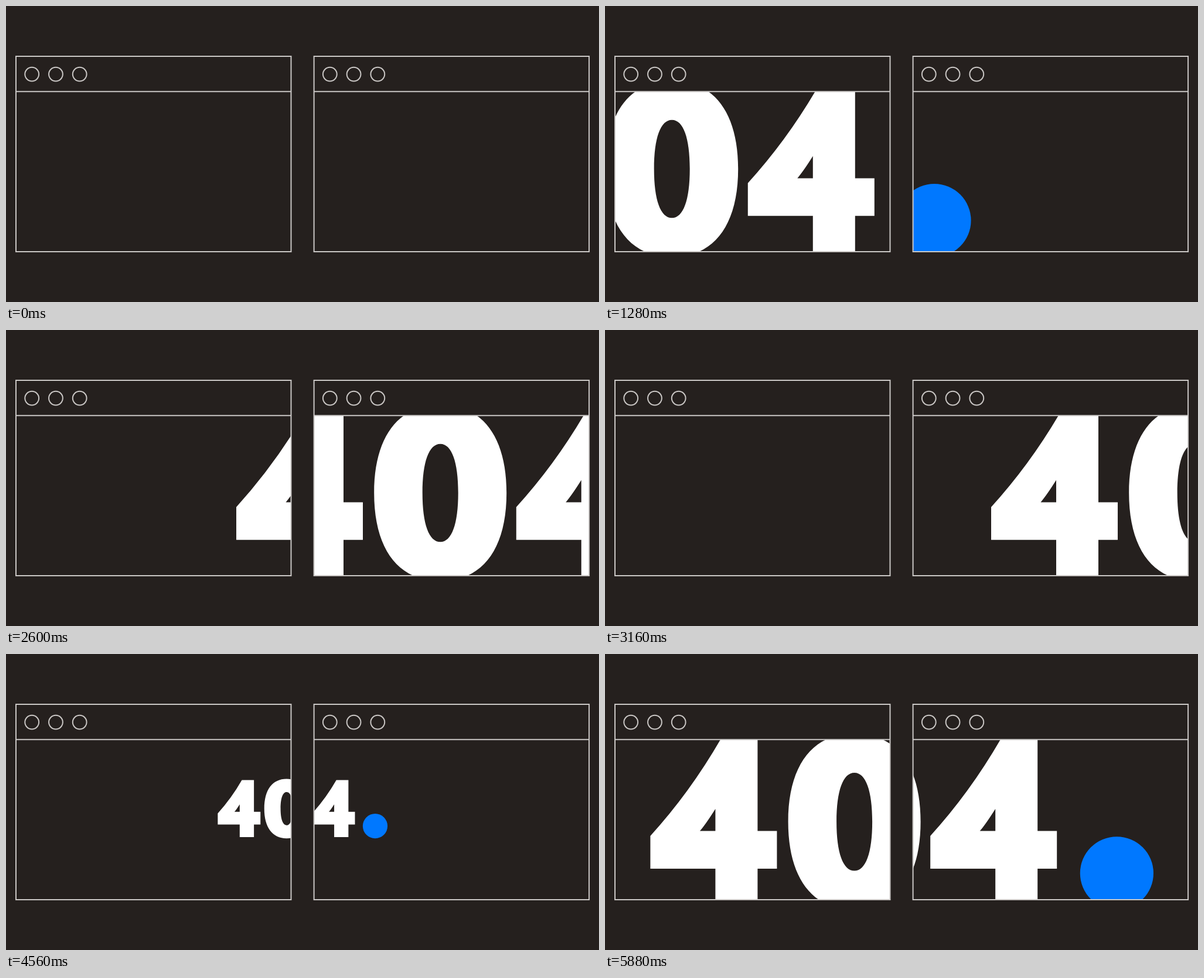
An HTML page with a canvas for the animation above (8.84 s loop, 1012 by 506 pixels).

```html
<!DOCTYPE html>
<html lang="en">
<head>
<meta charset="utf-8">
<title>404</title>
<style>
  html, body { margin: 0; width: 100%; height: 100%; overflow: hidden; background: #25201e; }
  canvas { display: block; width: 1012px; height: 506px; }
</style>
</head>
<body>
<canvas id="stage" width="1012" height="506"></canvas>
<script>
const LOOP = 8840, STEP = 40;
const SPEED = 0.475, PASS_START = -842;
const ZOOM_AT = 3902, ZOOM_TIME = 1950;
const BG = '#25201e', LINE = '#cac7c5', WHITE = '#ffffff', BLUE = '#0078ff';
const LEFT = 17, RIGHT = 486.5, TOP = 86, BAR = 146.3, BOTTOM = 420;
const GAP = 508.6;

const ctx = document.getElementById('stage').getContext('2d');

// Ellipse with fuller shoulders
function oval(path, cx, cy, rx, ry, k = 0.635) {
  const kx = rx * k, ky = ry * k;
  path.moveTo(cx + rx, cy);
  path.bezierCurveTo(cx + rx, cy + ky, cx + kx, cy + ry, cx, cy + ry);
  path.bezierCurveTo(cx - kx, cy + ry, cx - rx, cy + ky, cx - rx, cy);
  path.bezierCurveTo(cx - rx, cy - ky, cx - kx, cy - ry, cx, cy - ry);
  path.bezierCurveTo(cx + kx, cy - ry, cx + rx, cy - ky, cx + rx, cy);
  path.closePath();
}

function four(path, x) {
  path.moveTo(x, 302.7);
  path.quadraticCurveTo(x + 68.9, 226.9, x + 122, 134);
  for (const [dx, y] of [[183, 134], [183, 294.4], [216, 294.4], [216, 358.8],
                         [183, 358.8], [183, 422.8], [111, 422.8], [111, 358.8], [0, 358.8]]) {
    path.lineTo(x + dx, y);
  }
  path.closePath();
  path.moveTo(x + 84.5, 294.4);
  path.quadraticCurveTo(x + 95, 282, x + 111, 256.5);
  path.lineTo(x + 111, 294.4);
  path.closePath();
}

const digits = new Path2D();
four(digits, 0);
oval(digits, 348.2, 278.5, 113, 150.8);
oval(digits, 348.2, 278.5, 30.5, 83.8);
four(digits, 477.8);

const dot = new Path2D();
dot.arc(796, 366.6, 62.6, 0, Math.PI * 2);

function drawNumber(t) {
  if (t < ZOOM_AT) {
    ctx.translate(PASS_START + SPEED * t, 0);
  } else {
    const s = Math.min(1, (t - ZOOM_AT) / ZOOM_TIME);
    ctx.translate(506, 253);
    ctx.scale(s, s);
    ctx.translate(-428.6, -244.8);
  }
  ctx.fillStyle = WHITE;
  ctx.fill(digits, 'evenodd');
  ctx.fillStyle = BLUE;
  ctx.fill(dot);
}

function drawWindow(x, t) {
  ctx.save();
  ctx.beginPath();
  ctx.rect(LEFT + x, BAR, RIGHT - LEFT, BOTTOM - BAR);
  ctx.clip();
  drawNumber(t);
  ctx.restore();

  ctx.strokeStyle = LINE;
  ctx.lineWidth = 2;
  ctx.strokeRect(LEFT + x, TOP, RIGHT - LEFT, BOTTOM - TOP);
  ctx.beginPath();
  ctx.moveTo(LEFT + x, BAR);
  ctx.lineTo(RIGHT + x, BAR);
  ctx.stroke();
  for (let i = 0; i < 3; i++) {
    ctx.beginPath();
    ctx.arc(44.2 + 40.75 * i + x, 116.6, 11.9, 0, Math.PI * 2);
    ctx.stroke();
  }
}

function draw(t) {
  ctx.fillStyle = BG;
  ctx.fillRect(0, 0, 1012, 506);
  drawWindow(0, t);
  drawWindow(GAP, t);
}

const start = performance.now();
function tick() {
  const t = (performance.now() - start) % LOOP;
  draw(Math.floor(t / STEP) * STEP);
  requestAnimationFrame(tick);
}
tick();
</script>
</body>
</html>
```
